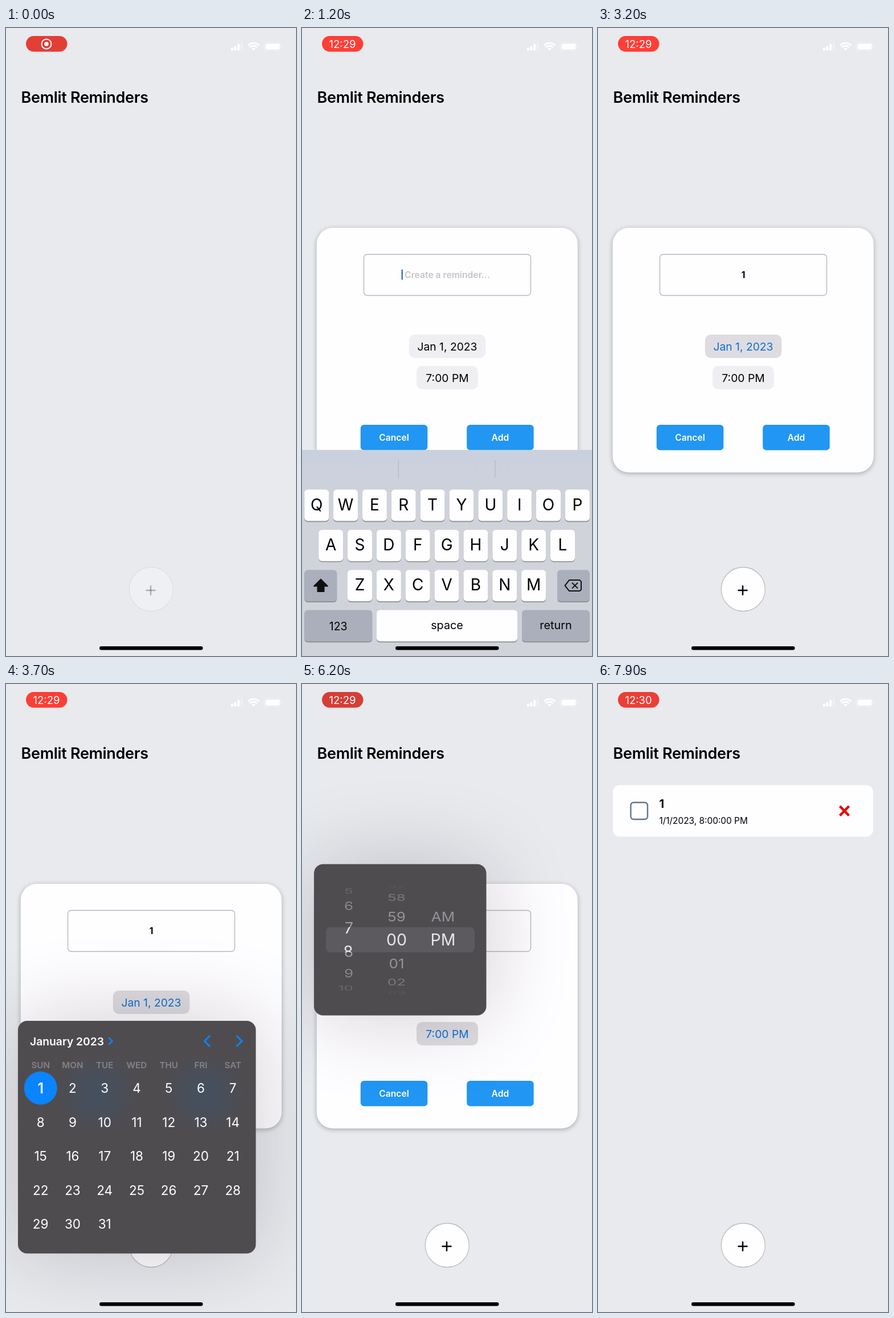
An HTML page with a canvas for the animation above (8000 ms loop, 509 by 1100 pixels).

```html
<!DOCTYPE html>
<html lang="en">
<head>
<meta charset="utf-8">
<title>Reminders app</title>
<style>
  html, body { margin: 0; width: 100%; height: 100%; overflow: hidden; background: #e8eaee; }
  canvas { display: block; width: 509px; height: 1100px; }
</style>
</head>
<body>
<canvas id="stage"></canvas>
<script>
const W = 509, H = 1100, LOOP = 8000;
const canvas = document.getElementById('stage');
const dpr = window.devicePixelRatio || 1;
canvas.width = W * dpr;
canvas.height = H * dpr;
const ctx = canvas.getContext('2d');

const BLUE = '#0a84ff', WHITE = '#fefdff', PANEL = '#4f4c50';

// ---- timing helpers
const clamp = v => Math.max(0, Math.min(1, v));
const progress = (t, from, to) => clamp((t - from) / (to - from));
const easeOut = p => 1 - (1 - p) ** 3;
const smooth = p => p * p * (3 - 2 * p);
const window01 = (t, inA, inB, outA, outB) =>
  easeOut(progress(t, inA, inB)) * (1 - smooth(progress(t, outA, outB)));

// ---- drawing helpers
function group(draw, { alpha = 1, dx = 0, dy = 0 } = {}) {
  ctx.save();
  ctx.globalAlpha *= alpha;
  ctx.translate(dx, dy);
  draw();
  ctx.restore();
}

function box(x, y, w, h, r, fill, stroke, line = 1.3) {
  ctx.beginPath();
  ctx.roundRect(x, y, w, h, r);
  if (fill) { ctx.fillStyle = fill; ctx.fill(); }
  if (stroke) { ctx.strokeStyle = stroke; ctx.lineWidth = line; ctx.stroke(); }
}

function shadowBox(x, y, w, h, r, fill, color, blur, offset) {
  group(() => {
    ctx.shadowColor = color;
    ctx.shadowBlur = blur * dpr;
    ctx.shadowOffsetY = offset * dpr;
    box(x, y, w, h, r, fill);
  });
}

function disc(x, y, r, fill, stroke, line) {
  box(x - r, y - r, 2 * r, 2 * r, r, fill, stroke, line);
}

function path(points, color, width, close) {
  ctx.beginPath();
  points.forEach(([x, y]) => ctx.lineTo(x, y));
  if (close) ctx.closePath();
  ctx.strokeStyle = color;
  ctx.lineWidth = width;
  ctx.stroke();
}

// y is the middle of the capital letters
function text(str, x, y, size, color = '#000', weight = 400, align = 'center', spacing = 0) {
  ctx.font = `${weight} ${size}px Inter, sans-serif`;
  ctx.letterSpacing = spacing + 'px';
  ctx.textAlign = align;
  ctx.fillStyle = color;
  ctx.fillText(str, x, y + size * 0.364);
}

// ---- main screen
function statusBar(t) {
  const pulse = Math.cos((t / 2000 - 0.7) * 2 * Math.PI);
  const red = Math.min(255, Math.round(236 + 28 * pulse));
  box(35, 14, 72.5, 27.5, 14, `rgb(${red},62,54)`);
  const clock = progress(t, 100, 400);
  group(() => {
    disc(71, 28, 8.5, null, '#fff', 2);
    disc(71, 28, 3.7, '#fff');
  }, { alpha: 1 - clock });
  group(() => text(t < 7100 ? '12:29' : '12:30', 71, 28, 18.5, '#fff'), { alpha: clock });

  [5, 8, 12].forEach((h, i) => box(395 + i * 5.6, 39.5 - h, 4, h, 1, '#fff'));
  box(411.8, 25, 4, 14.5, 1, '#eeeff2');
  ctx.beginPath();
  ctx.moveTo(434.5, 39.5);
  ctx.arc(434.5, 39.5, 5, -Math.PI * 0.75, -Math.PI * 0.25);
  ctx.fillStyle = '#fff';
  ctx.fill();
  [8.5, 13.2].forEach(r => {
    ctx.beginPath();
    ctx.arc(434.5, 39.5, r, -Math.PI * 0.76, -Math.PI * 0.24);
    ctx.strokeStyle = '#fff';
    ctx.lineWidth = 2.8;
    ctx.stroke();
  });
  box(453.5, 25.5, 29, 14, 4, null, '#f1f2f5', 1.2);
  box(455.5, 27.5, 25, 10, 2.5, '#fff');
}

function plusButton(t) {
  group(() => {
    disc(254.8, 983, 38.5, WHITE, '#bdbcc0', 1.3);
    path([[245.5, 985], [262.5, 985]], '#000', 2.5);
    path([[254, 976.5], [254, 993.5]], '#000', 2.5);
  }, { alpha: 0.27 + 0.73 * progress(t, 50, 350) });
}

function reminderRow() {
  box(26, 177, 457, 90.5, 12, WHITE);
  box(57.5, 207.5, 29.5, 29.5, 5, null, '#64748b', 2.4);
  text('1', 107.5, 210, 20, '#000', 700, 'left');
  text('1/1/2023, 8:00:00 PM', 107.5, 239, 15.4, '#000', 400, 'left');
  path([[424.5, 214], [440.5, 230.5]], '#e30b0b', 4.4);
  path([[440.5, 214], [424.5, 230.5]], '#e30b0b', 4.4);
}

// ---- modal card
function chip(label, x, y, w, active) {
  box(x, y, w, 41, 10, active ? '#dedce1' : '#efeef1');
  text(label, 255, y + 20.8, 19.3, active ? '#0a6fd6' : '#000');
}

function button(label, x, alpha = 1) {
  group(() => {
    box(x, 695, 117.5, 44.5, 6, '#2196f3');
    text(label, x + 58.7, 717.5, 15.7, '#fff', 600);
  }, { alpha });
}

function modal(t) {
  shadowBox(25.8, 350, 458, 428.5, 28, WHITE, 'rgba(0,0,0,.28)', 8, 2);
  box(108.5, 396.5, 293, 72, 6, null, '#b8b8ba', 1.4);
  const typed = t >= 2200;
  if (typed) text('1', 255, 432.5, 15.5, '#000', 700);
  else text('Create a reminder...', 255, 432.5, 15.7, '#c5c4c8', 600);

  const focusedAt = t < 2800 ? 1050 : 4400;
  const focused = (t > 1050 && t < 2800) || (t > 4400 && t < 5150);
  if (focused && (t - focusedAt) % 1000 < 550) box(typed ? 261 : 174.5, 423, 2.5, 18, 1, '#3f70d6');

  chip('Jan 1, 2023', 187.8, 537, 134.5, t > 3200 && t < 4000);
  chip(t < 6600 ? '7:00 PM' : '8:00 PM', 201, 592, 108, t > 5500 && t < 7300);
  button('Cancel', 102.8);
  button('Add', 289.2, 1 - 0.75 * progress(t, 7420, 7500));
}

// ---- popovers
function popover(shown, x, y, w, h, originX, originY, draw) {
  if (shown <= 0) return;
  group(() => {
    const scale = 0.3 + 0.7 * shown;
    ctx.translate(originX, originY);
    ctx.scale(scale, scale);
    ctx.translate(-originX, -originY);
    shadowBox(x, y, w, h, 16, PANEL, 'rgba(30,15,25,.2)', 150, 0);
    draw();
  }, { alpha: shown });
}

function glow(x, y) {
  const g = ctx.createRadialGradient(x, y, 0, x, y, 75);
  g.addColorStop(0, 'rgba(50,88,122,.4)');
  g.addColorStop(1, 'rgba(50,88,122,0)');
  ctx.fillStyle = g;
  ctx.fillRect(x - 75, y - 75, 150, 150);
}

function calendar() {
  glow(161, 717);
  glow(348, 717);
  text('January 2023', 42, 625.5, 19.3, '#fff', 600, 'left');
  path([[180, 619.5], [186.5, 625.5], [180, 631.5]], BLUE, 2.4);
  path([[358, 616], [348.5, 625.5], [358, 635]], BLUE, 3);
  path([[404.5, 616], [414, 625.5], [404.5, 635]], BLUE, 3);
  const columnX = i => 60.7 + 56.25 * i;
  'SUN MON TUE WED THU FRI SAT'.split(' ')
    .forEach((day, i) => text(day, columnX(i), 667, 15.2, '#858288', 600));
  disc(60.7, 707.8, 29, BLUE);
  for (let d = 1; d <= 31; d++) {
    const y = 707.8 + 59.6 * Math.floor((d - 1) / 7);
    text(d, columnX((d - 1) % 7), y, d === 1 ? 25 : 22.5, '#fff', d === 1 ? 600 : 400);
  }
}

function wheel(position, label, x, align, size, color, fade) {
  for (let i = Math.floor(position) - 3; i <= Math.ceil(position) + 3; i++) {
    const angle = (i - position) * 0.446, value = label(i);
    if (!value || Math.abs(angle) > 1.42) continue;
    group(() => {
      ctx.translate(x, 448 + 95 * Math.sin(angle));
      ctx.scale(1, Math.cos(angle));
      text(value, 0, 0, size, color, 400, align);
    }, { alpha: fade ? Math.cos(angle) ** 1.3 : 1 });
  }
}

function timePicker(t) {
  const hour = 7 + smooth(progress(t, 5850, 6550));
  const bandY = 426, bandH = 44;
  box(42, bandY, 261, bandH, 8, '#5d5a5f');
  const wheels = (size, color, fade) => {
    wheel(hour, i => String((i + 11) % 12 + 1), 90, 'right', size, color, fade);
    wheel(0, i => String((i + 60) % 60).padStart(2, '0'), 166, 'center', size, color, fade);
    wheel(1, i => ['AM', 'PM'][i], 247.5, 'center', size, color, fade);
  };
  group(() => {
    ctx.beginPath();
    ctx.rect(21, bandY, 302, bandH);
    ctx.clip();
    wheels(28.5, '#e6e5e7', false);
  });
  group(() => {
    ctx.beginPath();
    ctx.rect(21, 315, 302, bandY - 315);
    ctx.rect(21, bandY + bandH, 302, 580 - bandY - bandH);
    ctx.clip();
    wheels(26, '#a09ea2', true);
  });
}

// ---- keyboard
const LAYOUTS = {
  upper: ['QWERTYUIOP', 'ASDFGHJKL', 'ZXCVBNM'],
  lower: ['qwertyuiop', 'asdfghjkl', 'zxcvbnm'],
  digits: ['1234567890', '-/:;()$&@″', '.,?!′']
};
const KEY_PITCH = 50.85;

function key(x, row, w, label, size, special, dy = 0) {
  const y = 731.5 + row * 70.3;
  box(x, y + 1.7, w, 55, 6, '#8b8d93');
  box(x, y, w, 55, 6, special ? '#abafbc' : WHITE);
  if (label) text(label, x + w / 2, y + 28 + dy, size);
}

function deleteIcon() {
  path([[461.5, 899.5], [469, 890], [487.5, 890], [490, 892.5], [490, 906.5], [487.5, 909], [469, 909]], '#111', 2, true);
  path([[474, 894.5], [484, 904.5]], '#111', 2);
  path([[484, 894.5], [474, 904.5]], '#111', 2);
}

function shiftIcon(filled) {
  path([[33, 888.5], [45, 900.5], [38.5, 900.5], [38.5, 910], [27.5, 910], [27.5, 900.5], [21, 900.5]], '#111', 2, true);
  if (filled) { ctx.fillStyle = '#111'; ctx.fill(); }
}

function smileyIcon() {
  const ink = '#505258';
  disc(55.3, 1048, 16.2, null, ink, 2.6);
  disc(49.8, 1043, 2.3, ink);
  disc(60.8, 1043, 2.3, ink);
  ctx.beginPath();
  ctx.arc(55.3, 1049, 10, 0.05, Math.PI - 0.05);
  ctx.closePath();
  ctx.fillStyle = ink;
  ctx.fill();
  box(48, 1050.5, 14.6, 2.6, 1, '#d1d3da');
}

function micIcon() {
  const ink = '#505258';
  box(448, 1029, 11, 24, 5.5, null, ink, 2.3);
  ctx.beginPath();
  ctx.moveTo(442, 1044);
  ctx.lineTo(442, 1047);
  ctx.arc(453.5, 1047, 11.5, Math.PI, 0, true);
  ctx.lineTo(465, 1044);
  ctx.stroke();
  path([[453.5, 1058.5], [453.5, 1064.5]], ink, 2.3);
  path([[446, 1064.5], [461, 1064.5]], ink, 2.3);
}

function keyPopup() {
  group(() => {
    ctx.shadowColor = 'rgba(0,0,0,.3)';
    ctx.shadowBlur = 5 * dpr;
    ctx.beginPath();
    ctx.moveTo(4, 659);
    ctx.arcTo(4, 646.5, 20, 646.5, 12);
    ctx.arcTo(80.5, 646.5, 80.5, 670, 12);
    ctx.lineTo(80.5, 706);
    ctx.bezierCurveTo(80.5, 726, 47, 730, 47, 750);
    ctx.arcTo(47, 786.5, 30, 786.5, 6);
    ctx.arcTo(4, 786.5, 4, 770, 6);
    ctx.closePath();
    ctx.fillStyle = WHITE;
    ctx.fill();
  });
  text('1', 41.5, 685, 46, '#000', 300);
}

function keyboard(t) {
  const mode = t < 1700 ? 'upper' : t < 3600 ? 'digits' : 'lower';
  const digits = mode === 'digits';
  const [top, middle, bottom] = LAYOUTS[mode];
  const shade = ctx.createLinearGradient(0, 662, 0, 800);
  shade.addColorStop(0, '#c9d0de');
  shade.addColorStop(1, '#d1d3da');
  ctx.fillStyle = shade;
  ctx.fillRect(0, 662, W, H - 662);
  [169.3, 339].forEach(x => path([[x, 680], [x, 711]], '#b3b9c8', 1.2));
  if (t >= 2200) text('“1”', 85, 695, 20);

  const size = digits ? 26 : 28, lift = digits ? 0.5 : -2;
  const row = (chars, x, index, pitch = KEY_PITCH, w = 43) =>
    [...chars].forEach((c, i) => key(x + i * pitch, index, w, c, size, false, lift));
  row(top, 4.2, 0);
  row(middle, digits ? 4.2 : 29.2, 1);
  if (digits) row(bottom, 80, 2, 71.5, 63.5);
  else row(bottom, 80, 2);

  key(4.2, 2, 57, digits ? '#+=' : '', 16.5, true);
  if (!digits) shiftIcon(mode === 'upper');
  key(448, 2, 57, '', 0, true);
  deleteIcon();
  key(4.2, 3, 119, digits ? 'ABC' : '123', 19.5, true, 0.5);
  key(131, 3, 247, 'space', 19.8, false, -2);
  key(386, 3, 119, 'return', 19.8, true, -2);
  smileyIcon();
  micIcon();
  if (t >= 1950 && t < 2200) keyPopup();
}

// ---- whole scene
function render(t) {
  ctx.setTransform(dpr, 0, 0, dpr, 0, 0);
  ctx.fillStyle = '#e8eaee';
  ctx.fillRect(0, 0, W, H);
  ctx.lineJoin = 'round';

  text('Bemlit Reminders', 26.5, 121, 27, '#000', 600, 'left', -0.3);
  if (t >= 7480) reminderRow();
  plusButton(t);

  const modalShown = window01(t, 150, 650, 7480, 7880);
  if (modalShown > 0) group(() => modal(t), { dy: (1 - modalShown) * H });

  popover(window01(t, 3250, 3550, 3850, 4100), 21, 590, 417.5, 407.5, 255, 585, calendar);
  popover(window01(t, 5500, 5800, 7250, 7450), 21, 315.5, 302.5, 265, 255, 585, () => timePicker(t));

  const keyboardShown = t < 3600
    ? window01(t, 1000, 1450, 2800, 3200)
    : window01(t, 4050, 4500, 5120, 5430);
  if (keyboardShown > 0) group(() => keyboard(t), { dy: (1 - keyboardShown) * 455 });

  statusBar(t);
  box(164, 1083, 181.5, 6.5, 3.25, '#000');
}

const start = performance.now();
function tick() {
  render((performance.now() - start) % LOOP);
  requestAnimationFrame(tick);
}
tick();
</script>
</body>
</html>
```
